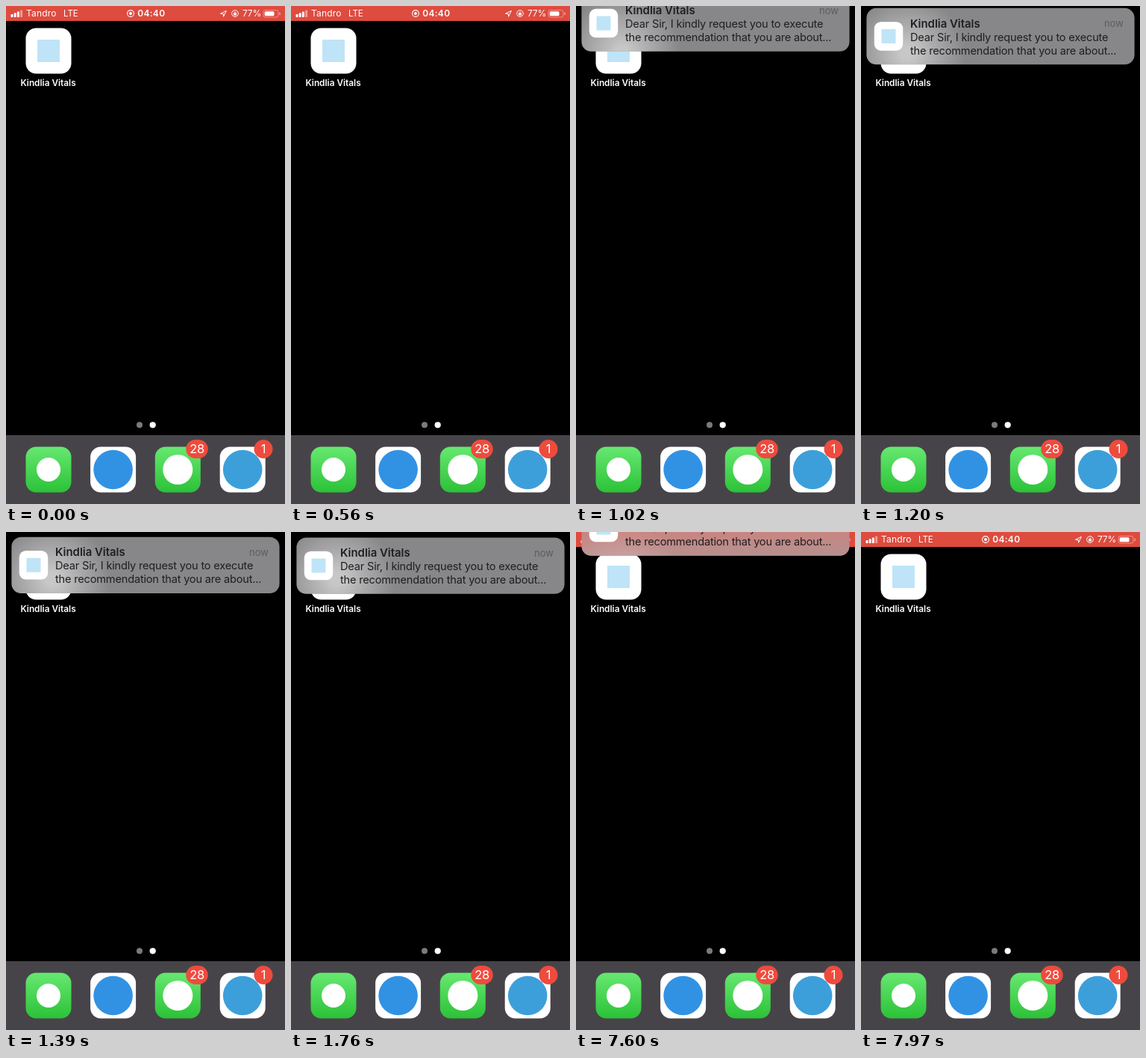
An HTML page with a canvas that plays this animation: 374 px wide and 666 px high, repeating every 8000 ms.

```html
<!DOCTYPE html>
<html lang="en">
<head>
<meta charset="utf-8">
<title>Notification banner</title>
<style>
  html, body { margin: 0; width: 100%; height: 100%; overflow: hidden; background: #000; }
  canvas { display: block; width: 374px; height: 666px; }
</style>
</head>
<body>
<canvas id="stage"></canvas>
<script>
const W = 374, H = 666, LOOP = 8000, STEP = 92.67;
const FONT = 'Inter, Roboto, "Liberation Sans", sans-serif';
const APP = 'Kindlia Vitals';

const canvas = document.getElementById('stage');
const ctx = canvas.getContext('2d');
const dpr = window.devicePixelRatio || 1;
canvas.width = Math.round(W * dpr);
canvas.height = Math.round(H * dpr);
ctx.scale(dpr, dpr);

const clamp = v => Math.max(0, Math.min(1, v));

// Critically damped spring: 1 at the start, settling to 0
function spring(ms) {
  const x = 0.0112 * Math.max(0, ms);
  return (1 + x) * Math.exp(-x);
}

function box(x, y, w, h, r, fill) {
  ctx.beginPath();
  ctx.roundRect(x, y, w, h, r);
  ctx.fillStyle = fill;
  ctx.fill();
}

function disc(x, y, r, fill) {
  ctx.beginPath();
  ctx.arc(x, y, r, 0, Math.PI * 2);
  ctx.fillStyle = fill;
  ctx.fill();
}

function ring(x, y, r, width) {
  ctx.beginPath();
  ctx.arc(x, y, r, 0, Math.PI * 2);
  ctx.lineWidth = width;
  ctx.strokeStyle = '#fff';
  ctx.stroke();
}

function text(str, x, y, size, { weight = 400, fill = '#fff', align = 'left', gap = 0 } = {}) {
  ctx.font = `${weight} ${size}px ${FONT}`;
  ctx.letterSpacing = gap + 'px';
  ctx.textAlign = align;
  ctx.fillStyle = fill;
  ctx.fillText(str, x, y);
}

function vertical(y0, y1, from, to) {
  const g = ctx.createLinearGradient(0, y0, 0, y1);
  g.addColorStop(0, from);
  g.addColorStop(1, to);
  return g;
}

// Rounded tile with one plain mark, placed by its centre
function tile(cx, cy, fill, r, mark) {
  box(cx - 30.5, cy - 30.5, 61, 61, 14, fill);
  disc(cx, cy, r, mark);
}

function appIcon(cx, cy, size) {
  const s = size / 61, half = size / 2;
  box(cx - half, cy - half, size, size, 14 * s, '#fff');
  box(cx - 15 * s, cy - 15 * s, 30 * s, 30 * s, 0, '#bfe4f7');
}

function badge(cx, label, w) {
  box(cx - w / 2, 580, w, 25, 12.5, '#ee4b3d');
  text(label, cx, 598.4, 16.5, { align: 'center', gap: -0.3 });
}

function homeScreen() {
  ctx.fillStyle = '#000';
  ctx.fillRect(0, 0, W, H);

  appIcon(57, 60, 61);
  text(APP, 56.5, 106.5, 11.8, { weight: 600, align: 'center' });

  disc(179, 560.3, 4, '#7b7b7b');
  disc(196.7, 560.3, 4.1, '#fff');

  ctx.fillStyle = '#474449';
  ctx.fillRect(0, 574, W, H - 574);

  const green = vertical(590, 650, '#66e870', '#2cc238');
  tile(57, 620, green, 16, '#fff');
  tile(143.6, 620, '#fff', 26.3, '#3192e4');
  tile(230.3, 620, green, 20, '#fff');
  tile(317.2, 620, '#fff', 26.3, '#3d9fda');

  badge(256, '28', 29.5);
  badge(345, '1', 25);
}

function statusBar(alpha, fill) {
  if (alpha <= 0) return;
  ctx.save();
  ctx.globalAlpha = alpha;
  ctx.fillStyle = fill;
  ctx.fillRect(0, 0, W, 20);

  for (let i = 0; i < 4; i++) {
    const h = 4 + i * 1.8;
    box(6.5 + i * 4.2, 15 - h, 3, h, 0.7, i < 3 ? '#fff' : 'rgba(255,255,255,.45)');
  }
  text('Tandro', 27, 14.4, 12, { gap: 0.2 });
  text('LTE', 77, 14.4, 11.5);

  ring(167, 10, 4.4, 1.1);
  disc(167, 10, 2, '#fff');
  text('04:40', 194.8, 14.4, 12, { weight: 600, align: 'center', gap: 0.3 });

  // Location arrow
  ctx.beginPath();
  ctx.moveTo(287.5, 10.2);
  ctx.lineTo(295.3, 6.4);
  ctx.lineTo(291.6, 14.2);
  ctx.lineTo(291.3, 10.5);
  ctx.closePath();
  ctx.lineWidth = 1;
  ctx.stroke();

  // Rotation lock
  ring(307, 10, 4.3, 1);
  box(305, 9.5, 4, 3, 0.5, '#fff');
  ring(307, 9.2, 1.2, 0.7);

  text('77%', 317, 14.4, 12, { gap: -0.2 });
  ctx.beginPath();
  ctx.roundRect(345, 5.5, 20, 9.5, 2.8);
  ctx.strokeStyle = 'rgba(255,255,255,.55)';
  ctx.stroke();
  box(346.7, 7.2, 12.8, 6.1, 1.5, '#fff');
  box(366.4, 8.6, 1.3, 3.4, 0.6, 'rgba(255,255,255,.55)');
  ctx.restore();
}

function banner(dy, tint) {
  const x = 7.4, w = 359.2, top = 7.4 + dy, h = 75.4;
  if (top + h <= 0) return;
  ctx.save();
  box(x, top, w, h, 13, '#878688');
  ctx.clip();

  // Blurred glow of the icon beneath
  const glow = ctx.createRadialGradient(62, 63, 8, 62, 63, 78);
  glow.addColorStop(0, 'rgba(255,255,255,.54)');
  glow.addColorStop(0.4, 'rgba(255,255,255,.31)');
  glow.addColorStop(1, 'rgba(255,255,255,0)');
  ctx.fillStyle = glow;
  ctx.fillRect(x, top, w, h);
  if (tint) {
    ctx.fillStyle = vertical(0, 62, 'rgba(222,132,126,.75)', 'rgba(200,168,168,.5)');
    ctx.fillRect(x, top, w, h);
  }

  const dark = '#1f1e20', body = { fill: dark, gap: -0.2 };
  appIcon(37, 45 + dy, 38.5);
  text(APP, 66, 33.2 + dy, 14.9, { weight: 600, fill: dark });
  text('now', 352, 32.8 + dy, 13, { fill: tint ? '#7d5050' : '#5d5c5e', align: 'right' });
  text('Dear Sir, I kindly request you to execute', 66, 51.2 + dy, 14.6, body);
  text('the recommendation that you are about...', 66, 69.2 + dy, 14.6, body);
  ctx.restore();
}

function draw(t) {
  const leaving = t > 7422;
  homeScreen();
  if (leaving) {
    statusBar(1, t < 7590 ? '#fd463a' : '#de4b3f');
    banner(-86 * (1 - spring(t - 7422)), true);
  } else {
    statusBar(1 - clamp((t - 650) / 150), '#de4b3f');
    if (t > 785) banner(-84 * spring(t - 785), false);
  }
}

function hold(t) {
  const at = n => Math.round(n * STEP / 10) * 10;
  let n = Math.floor(t / STEP) + 1;
  while (at(n) > t) n--;
  return at(n);
}

const start = performance.now();
function tick() {
  draw(hold((performance.now() - start) % LOOP));
  requestAnimationFrame(tick);
}
tick();
</script>
</body>
</html>
```
